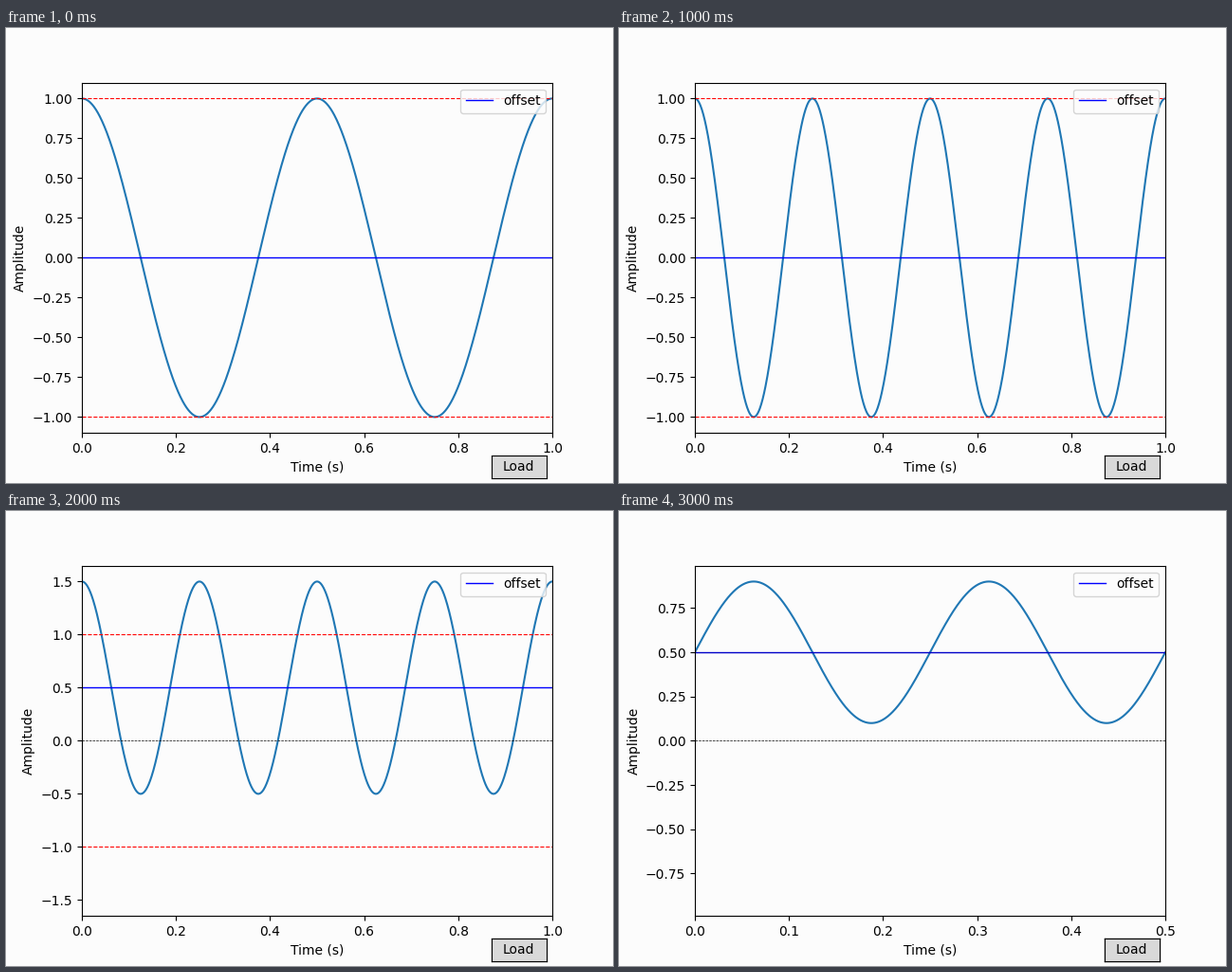
Animation, 640 px wide and 480 px high, one loop 4 s. Source, as a matplotlib script:

```python
import numpy as np
import matplotlib.pyplot as plt
from matplotlib.animation import FuncAnimation

BACKGROUND = "#fcfcfc"
plt.rcParams.update({
    "font.family": "DejaVu Sans",
    "figure.facecolor": BACKGROUND,
    "axes.facecolor": BACKGROUND,
})

# frequency, phase, amplitude, offset, duration, offset colour, button layers
SIGNALS = [
    (2, 0, 1.0, 0.0, 1.0, "blue", 1),
    (4, 0, 1.0, 0.0, 1.0, "blue", 2),
    (4, 0, 1.0, 0.5, 1.0, "blue", 2),
    (4, -np.pi / 2, 0.4, 0.5, 0.5, "#0000c8", 3),
]

fig = plt.figure(figsize=(6.4, 4.8), dpi=100)


def draw_button(label):
    box = fig.add_axes([0.8, 0.01, 0.09, 0.05], facecolor="0.85")
    box.set(xticks=[], yticks=[])
    box.text(0.5, 0.5, label, ha="center", va="center",
             transform=box.transAxes)


def draw(index):
    freq, phase, amp, offset, duration, colour, layers = SIGNALS[index]
    fig.clear()
    ax = fig.add_subplot()

    t = np.linspace(0, duration, 1000)
    ax.plot(t, offset + amp * np.cos(2 * np.pi * freq * t + phase))
    ax.axhline(0, color="black", lw=0.5, ls="--")
    for level in (1, -1):
        ax.axhline(level, color="red", lw=0.8, ls="--")
    line = ax.axhline(offset, color=colour, lw=1, label="offset")

    limit = 1.1 * (offset + amp)
    ax.set(xlim=(0, duration), ylim=(-limit, limit),
           xlabel="Time (s)", ylabel="Amplitude")
    legend = ax.legend(handles=[line], loc="upper right")
    legend.get_lines()[0].set_color("blue")

    # Each reload stacks another button on the previous one.
    for _ in range(layers):
        draw_button("Load")
    return []


anim = FuncAnimation(fig, draw, frames=len(SIGNALS), interval=1000,
                     repeat=True, repeat_delay=0)
plt.show()
```
